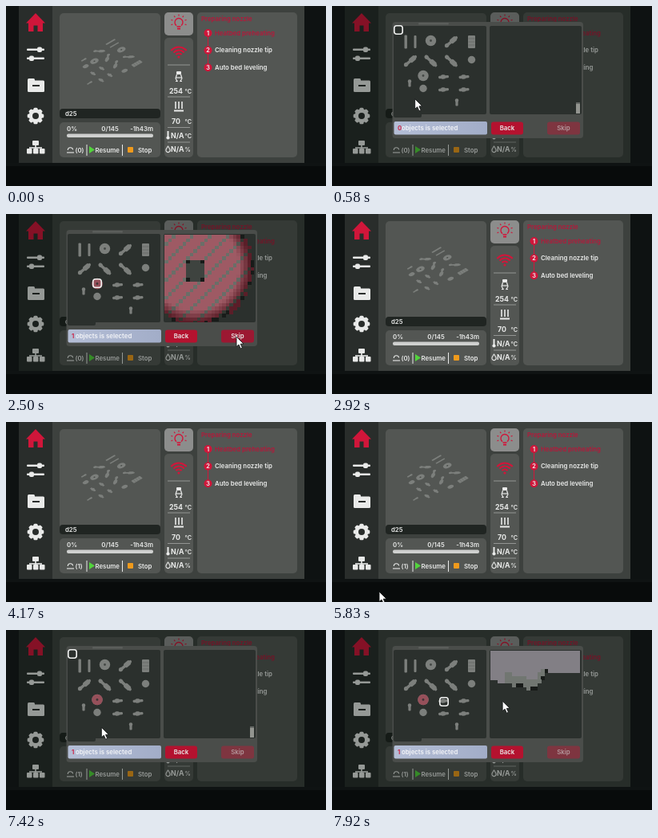
An HTML page with a canvas that plays this animation: 400 px wide and 226 px high, repeating every 8000 ms.

```html
<!DOCTYPE html>
<html lang="en">
<head>
<meta charset="utf-8">
<title>Printer panel</title>
<style>
html, body { margin: 0; width: 100%; height: 100%; overflow: hidden; background: #0a0d0d; }
canvas { display: block; width: 400px; height: 226px; }
</style>
</head>
<body>
<canvas id="stage" width="400" height="226"></canvas>
<script>
const g = document.getElementById('stage').getContext('2d');
const LOOP = 8000, STEP = 1000 / 12;
const RED = '#d0163a', WHITE = '#e9eae9', PANEL = '#535653', DARK = '#2b302d', PART = '#7c7f7c';

function box(x, y, w, h, color, r = 0) {
  g.fillStyle = color;
  g.beginPath();
  g.roundRect(x, y, w, h, r);
  g.fill();
}
function disc(x, y, r, color) {
  g.fillStyle = color;
  g.beginPath();
  g.arc(x, y, r, 0, 7);
  g.fill();
}
function triangle(x, y, w, h, color, pointsRight) {
  g.fillStyle = color;
  g.beginPath();
  g.moveTo(x, y);
  if (pointsRight) g.lineTo(x + w, y + h / 2);
  else g.lineTo(x + w / 2, y - h);
  g.lineTo(pointsRight ? x : x + w, pointsRight ? y + h : y);
  g.fill();
}
function line(x0, y0, x1, y1, color = WHITE, width = 1) {
  g.strokeStyle = color;
  g.lineWidth = width;
  g.beginPath();
  g.moveTo(x0, y0);
  g.lineTo(x1, y1);
  g.stroke();
}
function arc(x, y, r, from, to, color, width) {
  g.strokeStyle = color;
  g.lineWidth = width;
  g.beginPath();
  g.arc(x, y, r, from, to);
  g.stroke();
}
function text(str, x, y, size = 7.8, color = WHITE, align = 'left', weight = 600) {
  g.font = `${weight} ${size}px Inter, sans-serif`;
  g.fillStyle = color;
  g.textAlign = align;
  g.fillText(str, x, y);
}
function turned(x, y, degrees, paint) {
  g.save();
  g.translate(x, y);
  g.rotate(degrees * Math.PI / 180);
  paint();
  g.restore();
}
const noise = (i, j) => {
  const n = Math.sin(i * 12.9898 + j * 78.233) * 43758.5453;
  return n - Math.floor(n);
};

function sidebar() {
  box(16, 0, 42, 197, '#292d2b');
  triangle(25, 21.5, 24, 12.5, RED);
  box(28, 20, 18, 12, RED);
  box(34.5, 24.5, 5, 8, '#292d2b');

  [0, 1].forEach(i => {
    const y = 54.5 + i * 11;
    box(26, y - 1, 22, 2.4, WHITE, 1);
    box(39 - i * 10, y - 3, 6, 6.4, WHITE, 2);
  });

  box(27, 91, 9, 6, WHITE, 1.5);
  box(27, 93.5, 21, 14.5, WHITE, 1.5);
  box(33, 99, 9, 2, '#292d2b');

  for (let a = 0; a < 180; a += 45) turned(37, 138, a, () => box(-10.3, -2.6, 20.6, 5.2, WHITE, 1.5));
  disc(37, 138, 8.4, WHITE);
  disc(37, 138, 4, '#292d2b');

  box(33, 169, 8, 6, WHITE, 1);
  line(29, 178, 45, 178, WHITE, 1.6);
  line(37, 175, 37, 181, WHITE, 1.6);
  for (let x = 26; x < 48; x += 8) box(x, 179, 6.5, 6.5, WHITE, 1);
}

// Parts on the print bed, one character per place; '.' is empty.
const BED = ['|o/#', '/\\\\o', '.o~~', '.o~~'];
const SHAPES = {
  '|'() {
    box(-7.5, -8.5, 3.4, 17, PART, 1);
    box(4.5, -8, 3, 16, PART, 1);
  },
  'o'(radius) {
    disc(0, 0, radius, PART);
    if (radius > 5) disc(0, 0, 1.4, '#444845');
  },
  '/'() { turned(0, 0, -40, arm); },
  '\\'() { turned(0, 0, 42, arm); },
  '#'() {
    box(-4.5, -8, 9, 16, PART, 1);
    for (let y = -4; y < 8; y += 4) line(-4, y, 4, y, '#5f625f', 0.7);
  },
  '~'() { turned(0, 0, -5, () => { box(-6.5, -1.6, 13, 3.4, PART, 1.5); box(-3.5, -2.8, 6, 5.4, PART, 2); }); }
};
function arm() {
  box(-10, -1.7, 20, 3.4, PART, 1.6);
  box(-1, -3.2, 9, 6.2, PART, 2);
  disc(-7, 0, 2.6, PART);
}
function pin(x, y) {
  box(x - 1.6, y - 4, 3.2, 8.5, PART, 1);
  disc(x, y - 2.5, 2.2, PART);
}
function bedParts(selected) {
  BED.forEach((row, r) => [...row].forEach((kind, c) => {
    if (kind === '.') return;
    const x = (r < 2 ? 98 : 88.5) + c * 25.5, y = 45 + 26 * r - 2 * r * r;
    const radius = (r + c) % 2 || r === 0 ? 6.7 : 4.7;
    turned(x, y - (kind === 'o' ? 1.5 : 0), 0, () => SHAPES[kind](radius));
  }));
  pin(97, 97);
  pin(156, 121);
  if (selected) {
    disc(114, 87.5, 6.8, '#96505a');
    disc(114, 87.5, 1.4, '#3f3437');
  }
}

function jobPanels(count) {
  box(67, 9, 126, 132, PANEL, 5);
  box(67, 129, 126, 12, '#202522', 4);
  // The same bed seen in perspective.
  g.save();
  g.translate(133, 47);
  g.transform(0.4, 0.33, -0.68, 0.4, 0, 0);
  g.translate(-98, -45);
  bedParts(false);
  g.restore();
  text('d25', 74, 138);

  box(67, 146, 126, 44, PANEL, 5);
  text('0%', 76, 157);
  text('0/145', 130, 157, 7.8, WHITE, 'center');
  text('-1h43m', 184, 157, 7.8, WHITE, 'right');
  box(76, 160.5, 108, 4.5, '#cfd0cf', 2);
  arc(80.5, 181, 3.2, Math.PI, 6.1, WHITE, 1.1);
  line(76, 184, 85, 184, WHITE, 1.1);
  text(`(${count})`, 86.5, 183.5);
  line(101, 174, 101, 188);
  line(145.5, 174, 145.5, 188);
  triangle(104, 176, 7, 9, '#52d33c', true);
  text('Resume', 111.5, 183.5);
  box(152, 177, 7, 7, '#ef9a1c', 1);
  text('Stop', 165, 183.5);
}

function reading(value, unit, x, y) {
  text(value, x, y, 8.8, WHITE, 'left', 700);
  text(unit, 223.5, y, 7.3);
}
function statusColumn() {
  box(198, 8, 36, 29, '#8c8d8c', 5);
  arc(216, 20.5, 5, 2.2, 7.2, RED, 1.4);
  box(213.5, 25, 5, 1.5, RED);
  box(214, 27.5, 4, 2, RED);
  for (let i = 0; i < 7; i++) turned(216, 20.5, 162 + i * 36, () => line(8, 0, 10, 0, RED, 1.2));

  box(198, 40, 36, 150, PANEL, 5);
  for (let r = 4.5; r < 14; r += 4) arc(216, 64, r, Math.PI * 1.22, Math.PI * 1.78, RED, 2.2);
  disc(216, 64, 1.6, RED);
  [74, 114, 152.5, 171].forEach(y => line(202, y, 230, y, '#a4a6a4', 0.8));

  box(213, 82, 6, 4, WHITE, 1);
  [-1, 1].forEach(side => {
    line(216 + side * 2.5, 86, 216 + side * 4, 91, WHITE, 1.2);
    line(216 + side * 4, 91, 216 + side * 1.5, 95, WHITE, 1.2);
    line(216 + side * 4, 94.5, 216 + side * 2, 94.5, WHITE, 1.2);
  });
  line(212.5, 90, 219.5, 90, WHITE, 1.2);
  reading('254', '℃', 204, 109.5);

  for (let x = 212; x < 222; x += 4) line(x, 120, x, 129, WHITE, 1.6);
  box(210, 130.5, 12, 2, WHITE);
  reading('70', '℃', 207, 147.5);

  line(202.5, 157, 202.5, 165, WHITE, 2);
  disc(202.5, 165.5, 2.1, WHITE);
  reading('N/A', '℃', 206, 166);

  arc(202.5, 181, 2.6, -0.5, 3.65, WHITE, 1.1);
  line(200.1, 180, 202.5, 175.8, WHITE, 1.1);
  line(204.9, 180, 202.5, 175.8, WHITE, 1.1);
  reading('N/A', '%', 206, 183);
}

function stepsPanel() {
  box(239, 8, 125, 182, PANEL, 5);
  text('Preparing nozzle', 244, 19, 7.8, '#b5183a');
  line(252.5, 34, 252.5, 77, RED);
  ['Heatbed preheating', 'Cleaning nozzle tip', 'Auto bed leveling'].forEach((label, i) => {
    const y = 34 + i * 21.6;
    disc(252.5, y, 5, RED);
    text(i + 1, 252.5, y + 2.6, 7.2, WHITE, 'center', 700);
    text(label, 261, y + 2.8, 7.8, i ? WHITE : '#b5183a');
  });
}

function home(count) {
  box(0, 0, 400, 226, '#0e1212');
  box(0, 197, 400, 29, '#080b0b');
  box(0, 197, 400, 4, '#0f1313');
  box(16, 0, 357, 197, '#3d413e');
  sidebar();
  jobPanels(count);
  statusColumn();
  stepsPanel();
}

const CELL = 4.5;
function eachCell(paint) {
  g.save();
  g.beginPath();
  g.rect(198, 26, 112, 110);
  g.clip();
  for (let j = 0; j < 25; j++) {
    for (let i = 0; i < 25; i++) {
      const x = Math.round(198 + i * CELL), y = Math.round(26 + j * CELL);
      const rgb = paint(x + CELL / 2, y + CELL / 2, i, j);
      if (rgb) {
        g.fillStyle = `rgb(${rgb.map(Math.round)})`;
        g.fillRect(x, y, 5, 5);
      }
    }
  }
  g.restore();
}
const INK = [24, 27, 25], HOLE = [62, 67, 63];
const lilac = v => [v, v - 3, v + 3];

function zoomDisc(selected) {
  eachCell((x, y, i, j) => {
    const dx = Math.abs(x - 236), dy = Math.abs(y - 72);
    if (dx < 12 && dy < 12) return dx > 8 && dy > 8 ? INK : HOLE;

    const d = Math.hypot(x - 236, y - 66);
    if (d > 73) return null;
    if (d > 70 && noise(i, j) > 0.55) return INK;
    const rim = Math.max(0, Math.min(1, (d - 55) / 14));
    const v = 132 - rim * 60;
    if (selected) return (i + j) % 5 === 2 ? [v - 26, v - 22, v - 28] : [v + 26 - rim * 8, v - 42, v - 32];
    return rim > 0.2 ? [v, v + 1, v] : lilac(v);
  });
}

function zoomClip() {
  eachCell((x, y, i, j) => {
    const edge = Math.max(53, Math.min(62 + (x - 198) * 0.26, 78 - (x - 252) * 1.5));
    const depth = edge - y;
    if (depth < 0) return null;
    if (depth < CELL && edge > 53 && noise(i, j) > 0.35) return INK;
    return depth < 14 && x > 215 && edge > 60 ? [113, 118, 113] : lilac(130);
  });
}
function zoomCorner() {
  box(305, 121, 5, 14, '#92948f');
  box(305, 121, 5, 2, '#656865');
}

function button(label, x, w, color, ink) {
  box(x, 145.5, w, 16, color, 3);
  text(label, x + w / 2, 156.3, 7.8, ink, 'center');
}

function dialog({ selected, marker, view, canSkip }) {
  box(16, 0, 357, 197, 'rgba(2, 9, 5, 0.36)');
  box(75.5, 20, 238.5, 146, '#4a4d4a', 4);
  box(77, 25, 116, 111, DARK, 2);
  box(197, 25, 115, 111, DARK, 2);
  box(108, 21, 38, 2.5, '#5b5e5b', 2);
  box(77, 134, 35, 6, DARK, 2);
  bedParts(selected);
  view();

  g.strokeStyle = '#f0f1f0';
  g.lineWidth = 1.6;
  g.beginPath();
  g.roundRect(marker[0] - 5.2, marker[1] - 5.2, 10.4, 10.4, 3);
  g.stroke();

  const fill = g.createLinearGradient(78, 0, 194, 0);
  fill.addColorStop(0, '#b4bed6');
  fill.addColorStop(1, '#a2adc8');
  box(77.5, 145, 116.5, 16.5, fill, 2);
  text(selected ? '1' : '0', 82, 156.3, 7.8, RED);
  text('objects is selected', 87, 156.3, 7.8, '#f4f5f8');
  button('Back', 199, 40, '#b4122f', WHITE);
  button('Skip', 269, 41, canSkip ? '#9c1832' : '#7e3540', canSkip ? WHITE : '#b4999d');
}

function cursor([x, y]) {
  turned(x, y, 0, () => {
    g.fillStyle = '#fff';
    g.strokeStyle = '#181a1a';
    g.lineWidth = 0.9;
    g.lineJoin = 'round';
    g.beginPath();
    [[0, 0], [0, 12.5], [3, 10], [5.2, 15], [7.4, 14], [5.2, 9.2], [9, 9]].forEach(p => g.lineTo(...p));
    g.closePath();
    g.fill();
    g.stroke();
  });
}

const CORNER = [83, 30], MENU = [81, 182], RING = [114, 87], CLIP = [140, 90], PANE = [243, 93], SKIP = [288, 154];

// Each move: start time, duration, destination.
function glide(from, moves, t) {
  return moves.reduce((at, [start, length, to]) => {
    const u = Math.max(0, Math.min(1, (t - start) / length)), e = u * u * (3 - 2 * u);
    return at.map((v, k) => v + (to[k] - v) * e);
  }, from);
}

function draw(now) {
  const t = Math.floor((now % LOOP + 4) / STEP) * STEP + 1;
  home(t < 4160 ? 0 : 1);
  if (t > 80 && t < 2910) {
    const aimed = t > 1000, selected = t > 1750;
    dialog({
      selected,
      marker: aimed ? RING : CORNER,
      view: aimed ? () => zoomDisc(selected) : zoomCorner,
      canSkip: selected
    });
    cursor(glide(MENU, [[170, 660, RING], [1250, 330, PANE], [1750, 420, SKIP]], t));
  } else if (t > 5830) {
    if (t > 6660) {
      const aimed = t > 7750;
      dialog({ selected: true, marker: aimed ? CLIP : CORNER, view: aimed ? zoomClip : zoomCorner, canSkip: false });
    }
    cursor(glide([59, 213], [[5833, 667, MENU], [6917, 833, CLIP], [7750, 250, [238, 89]]], t));
  }
}

const start = performance.now();
function frame() {
  draw(performance.now() - start);
  requestAnimationFrame(frame);
}
frame();
</script>
</body>
</html>
```
